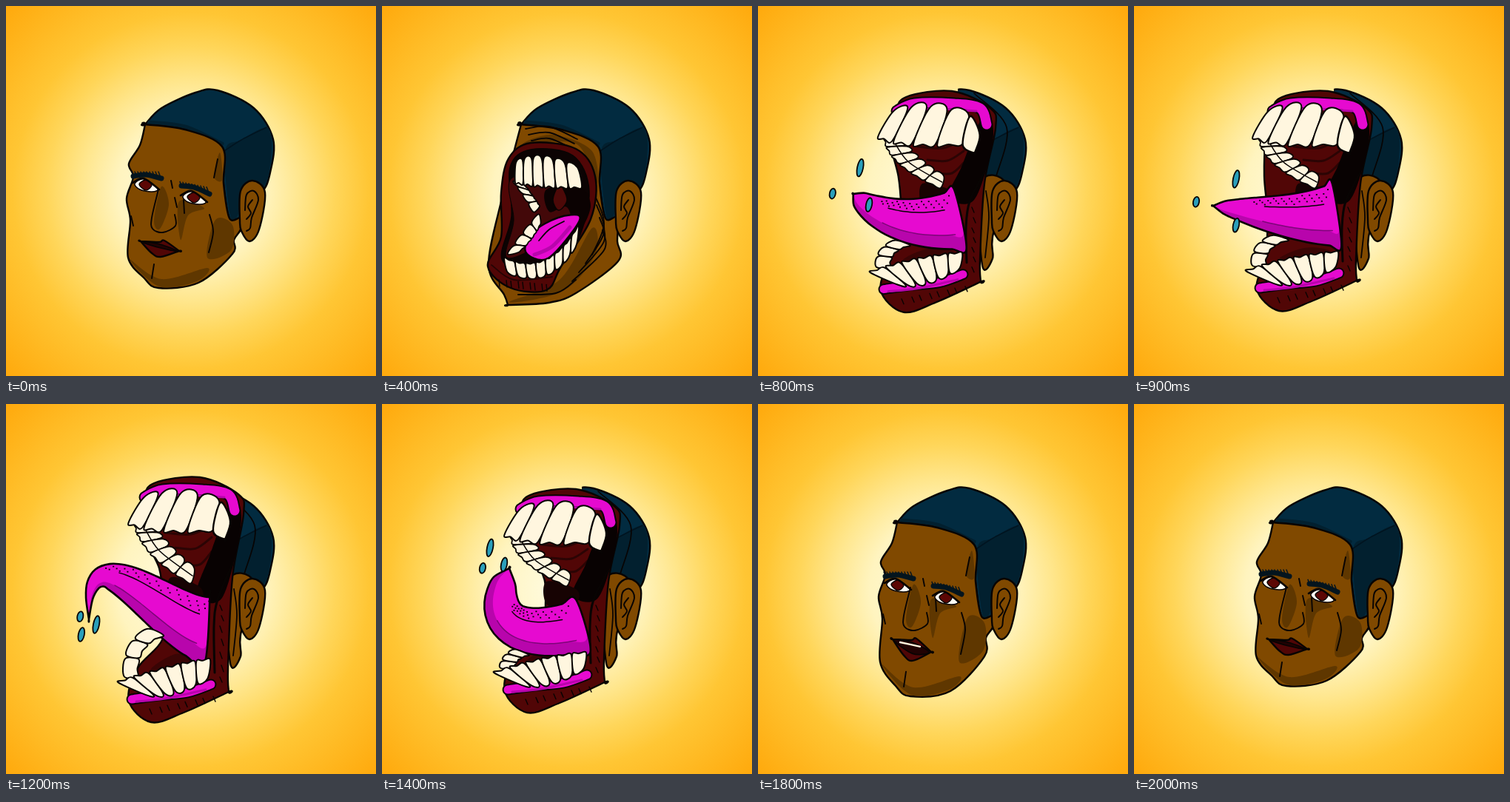
Write an HTML page with a canvas that moves like this. It is 500 px wide and 500 px high and loops after 2.1 s.

```html
<!DOCTYPE html>
<html lang="en">
<head>
<meta charset="utf-8">
<title>Shout</title>
<style>
html, body { margin: 0; height: 100%; overflow: hidden; background: #ffc53a }
canvas { display: block; width: 100vw; height: 100vh }
</style>
</head>
<body>
<canvas id="stage" width="500" height="500"></canvas>
<script>
const ctx = document.getElementById('stage').getContext('2d');
const SKIN = '#804900', SHADE = '#5f3700', HAIR = '#022b40', DEEP = '#02202f', RED = '#510606',
      INK = '#080403', PINK = '#e60ad0', PLUM = '#b805ac', TOOTH = '#fff6df';
const HAIRLINE = '302 287 294 240 292 190 242 167 188 160 188 160 ';
const still = (x, y) => [x, y];
let warp = still;

const nums = s => s.split(' ').map(Number);
const clamp = v => Math.max(0, Math.min(1, v));
const mix = (a, b, f) => Array.isArray(a) ? a.map((v, i) => mix(v, b[i], f)) : a + (b - a) * f;

// Smooth curve through points; a doubled point makes a corner.
function trace(pts, closed) {
  const p = typeof pts === 'string' ? nums(pts) : pts, n = p.length / 2;
  const at = i => {
    i = closed ? (i + n) % n : Math.max(0, Math.min(n - 1, i));
    return warp(p[2 * i], p[2 * i + 1]);
  };
  ctx.beginPath();
  ctx.moveTo(...at(0));
  for (let i = 0; i < (closed ? n : n - 1); i++) {
    const [a, b, c, d] = [at(i - 1), at(i), at(i + 1), at(i + 2)];
    ctx.bezierCurveTo(b[0] + (c[0] - a[0]) / 6, b[1] + (c[1] - a[1]) / 6,
      c[0] - (d[0] - b[0]) / 6, c[1] - (d[1] - b[1]) / 6, c[0], c[1]);
  }
  if (closed) ctx.closePath();
}
function stroke(width, color = INK) {
  ctx.lineWidth = width;
  ctx.strokeStyle = color;
  ctx.stroke();
}
function shape(pts, fill, width = 2.4) {
  trace(pts, true);
  ctx.fillStyle = fill;
  ctx.fill();
  if (width) stroke(width);
}
function line(pts, width = 2, color) {
  trace(pts, false);
  stroke(width, color);
}
function tube(pts, width, color) {
  line(pts, width + 4);
  stroke(width, color);
}

// Point on the parabola through three key points.
function along([ax, ay, mx, my, bx, by], u) {
  const a = (1 - u) * (1 - 2 * u), m = 4 * u * (1 - u), b = u * (2 * u - 1);
  return [a * ax + m * mx + b * bx, a * ay + m * my + b * by];
}
// A row of teeth filling the band between a gum curve and a biting edge.
function teeth(gum, edge, count, width = 2) {
  const [g, e] = [gum, edge].map(c => typeof c === 'string' ? nums(c) : c);
  for (let i = 0; i < count; i++) {
    const u = k => (i + k) / count;
    shape([...along(g, u(.1)), ...along(g, u(.9)), ...along(e, u(1)),
      ...along(e, u(.5)), ...along(e, u(.08))], TOOTH, width);
  }
}
function ticks(count, x, y, dx, dy, lx, ly) {
  for (let i = 0; i < count; i++) {
    const cx = x + i * dx + i % 2 * 2, cy = y + i * dy;
    line([cx, cy, cx + lx, cy + ly], 1.4);
  }
}

function backdrop() {
  const g = ctx.createRadialGradient(250, 250, 0, 250, 250, 354);
  [[0, '#fffce6'], [.28, '#fff4bf'], [.42, '#ffe68c'], [.55, '#ffd65a'], [.68, '#ffc634'], [1, '#ffa90c']]
    .forEach(s => g.addColorStop(...s));
  ctx.fillStyle = g;
  ctx.fillRect(0, 0, 500, 500);
}

function hair() {
  shape(HAIRLINE + '210 138 256 117 286 114 335 138 361 180 357 225 346 250 322 248 317 286', HAIR);
  shape('296 197 318 181 354 165 358 205 348 244 322 246 313 283 303 283', DEEP, 0);
  line('194 157 242 163 292 186', 5, DEEP);
  line('295 196 318 181 352 164', 1.6, '#011420');
}
function ear() {
  shape('316 290 317 250 333 236 350 252 342 302 329 318 318 304', SKIN);
  line('323 276 325 255 335 250 341 262 332 286 330 300 325 304', 2);
  line('333 262 327 271 331 280 325 288', 2);
}

function eye(x, y, tilt) {
  shape([x - 15, y - 2, x - 2, y - 8, x + 16, y + 5, x + 8, y + 9, x - 8, y + 6], '#fffdf4', 1.5);
  shape([x - 9, y - 1, x, y - 7, x + 8, y, x, y + 7], '#5c0705', 1.4);
  line([x - 18, y - 3, x - 3, y - 9, x + 18, y + 6], 2.6);
  line([x - 17, y - 12 - tilt, x, y - 14, x + 21, y - 9 + tilt], 7, '#04151e');
  for (let i = 0; i < 10; i++) {
    const bx = x - 17 + i * 4, by = y - 13 + tilt * (i - 4.5) / 5;
    line([bx, by, bx - 2, by - 5], 1.5, '#04151e');
  }
}

function calmFace(open) {
  const jaw = (x, y) => [x, y + open * 14 * clamp((y - 322) / 30)];
  warp = jaw;
  shape(HAIRLINE + '181 188 166 213 172 231 163 260 168 290 165 340 186 367 206 381 260 374 306 335 308 316 317 302 318 286', SKIN);
  shape('167 342 210 369 272 354 258 372 207 379', SHADE, 0);
  shape('210 244 200 290 208 301 220 268', SHADE, 0);
  shape('234 264 268 273 246 283 236 316', SHADE, 0);
  shape('283 289 306 296 304 330 272 340', SHADE, 0);
  shape('289 198 292 235 281 230', SHADE, 0);
  ['206 248 197 286 198 301 212 306 229 297 228 282', '228 259 231 272', '223 236 225 246', '240 262 241 280',
    '275 282 280 305 274 333', '286 207 281 232', '200 349 197 368', '169 284 172 297'].forEach(p => line(p, 1.9));

  warp = (x, y) => [x, y + open * 3];
  eye(189, 242, 0);
  eye(254, 259, 4);

  warp = jaw;
  shape('182 318 182 318 207 319 214 317 234 331 234 331 209 339 197 334', RED);
  const gap = open * 11;
  shape([184, 319, 208, 322, 231, 331, 209, 327 + gap / 2], '#210203', 1.8);
  if (open) line('192 322 219 326', 2.4, TOOTH);
  warp = still;
}

function openFace(size) {
  const big = size > 1;
  warp = (x, y) => big
    ? [Math.min(x, 290 + (x - 290) * size), Math.min(y, 292 + (y - 292) * size)]
    : [x, 160 + (y - 160) * (3 + size) / 4];
  shape(HAIRLINE + '179 194 162 260 144 350 165 390 170 404 170 404 225 401 262 388 319 345 318 318 318 286', SKIN);
  shape('284 300 288 336 245 385 172 400 240 370', SHADE, 0);
  shape('190 188 230 174 283 195 290 240 262 186', SHADE, 0);
  for (let i = 0; i < 3; i++) line([194 + i * 4, 166 + i * 8, 226, 163 + i * 8, 264 - i * 4, 180 + i * 6], 1.8);
  for (let i = 0; i < 4; i++) line([286 + i * 4, 252 + i * 17, 300, 294 + i * 12, 284 - i * 9, 336 + i * 12], 1.9);
  line('262 370 235 388 184 390');

  warp = (x, y) => big
    ? [290 + (x - 290) * size, 292 + (y - 292) * size]
    : [220 + (x - 220) * (size + 1) / 2, 310 + (y - 310) * size];
  shape('171 206 201 185 262 193 288 230 282 288 242 352 222 384 174 381 143 352 161 312 161 252', RED);
  shape('173 218 201 194 258 202 280 250 265 316 236 352 200 360 162 342 175 284', '#0c0303', 1.5);
  shape('176 232 254 238 260 278 220 318 169 340 178 290', '#430809', 1);
  shape('222 248 265 243 282 270 264 306 250 272 226 278', '#0b0202', 0);
  shape('240 242 250 262 239 276 231 262', '#4d0908', 1.5);
  shape('194 332 205 305 238 286 267 284 255 308 222 342', PINK);
  line('206 336 230 325 254 299', 5, PLUM);
  line('212 317 226 302 246 291', 1.8);
  teeth('177 236 190 254 206 280', '191 240 203 256 213 271', 4, 1.8);
  teeth('213 280 190 308 169 337', '215 292 202 314 184 333', 4, 1.8);
  teeth('180 212 217 206 266 219', '179 238 218 243 270 245', 6);
  teeth('168 359 222 363 264 320', '164 340 220 344 266 296', 8);
  ticks(9, 158, 370, 8, .8, 1, 9);
  line('148 350 178 370 230 366', 1.8, '#250303');
  warp = still;
}

function drops({ spray, reach, spin }) {
  for (let i = 0; i < 3; i++) {
    const a = spin + i * 2.1;
    ctx.beginPath();
    ctx.ellipse(spray[0] + reach * Math.cos(a), spray[1] + reach * Math.sin(a), 4, 12 - i * 2.5, .2, 0, 7);
    ctx.fillStyle = '#2a9fbb';
    ctx.fill();
    stroke(1.8);
  }
}

// A tapering ribbon along a cubic spine; side 1 is its upper edge, -1 its lower.
function tongue({ spine, root, tip }) {
  const [ax, ay, bx, by, cx, cy, dx, dy] = spine;
  const at = (t, side) => {
    const s = 1 - t;
    const cubic = (a, b, c, d) => a * s ** 3 + 3 * b * s * s * t + 3 * c * s * t * t + d * t ** 3;
    const slope = (a, b, c, d) => s * s * (b - a) + 2 * s * t * (c - b) + t * t * (d - c);
    const vx = slope(ax, bx, cx, dx), vy = slope(ay, by, cy, dy);
    const half = side * mix(root, tip, t) * Math.sqrt(1 - t ** 8) / Math.hypot(vx, vy);
    return [cubic(ax, bx, cx, dx) - vy * half, cubic(ay, by, cy, dy) + vx * half];
  };
  const edge = (side, from = 0, to = 1) =>
    Array.from({ length: 13 }, (_, i) => at(mix(from, to, i / 12), side));
  const ribbon = low => [...edge(1), ...edge(low).reverse()].flat();
  shape(ribbon(-1), PLUM, 0);
  shape(ribbon(-.5), PINK, 0);
  line(edge(-.5, .05, .6).flat(), 1.5, '#7d0678');
  line(edge(.4, .1, .6).flat(), 1.5);
  trace(ribbon(-1), true);
  stroke(2.6);
  ctx.fillStyle = INK;
  for (let i = 0; i < 30; i++) {
    const [x, y] = at(.05 + i * .022, .85 - i * 7 % 11 / 30);
    ctx.fillRect(x - 1, y - 1, 2, 1.8);
  }
}

function upperJaw(shift) {
  tube('188 142 212 132 265 132 300 138 309 160', 13, PINK);
  line('194 143 240 139 295 142', 3, PLUM);
  ctx.save();
  ctx.translate(shift, 0);
  teeth('198 180 220 206 256 231', '175 178 195 213 250 246', 6, 1.8);
  line('186 181 207 211 252 238', 1.5);
  teeth('184 143 234 136 291 148', '164 176 211 186 280 186', 4);
  shape('290 149 303 174 296 199 296 199 280 188', TOOTH);
  ctx.restore();
}
function lowerJaw(rise) {
  tube('170 386 205 381 245 377 277 366', 11, PINK);
  line('176 389 215 385 270 373', 3, PLUM);
  teeth([160, 358, 166, 358 - rise * .65, 170 + rise * .45, 356 - rise],
    [178, 358, 184, 362 - rise * .65, 186 + rise * .5, 364 - rise], 3);
  teeth('188 380 228 376 274 357', '150 364 214 346 276 336', 6);
}

function roar(pose) {
  const { up, low, edge } = pose;
  ctx.save();
  ctx.beginPath();
  ctx.rect(270, 0, 230, 500);
  ctx.clip();
  hair();
  ctx.restore();
  line('292 118 336 164 322 230', 1.7);
  shape('300 240 334 240 317 312 317 341 303 350', SKIN);
  line('308 250 312 285 307 340', 1.8);
  ear();

  warp = (x, y) => [x, y + up * clamp((260 - y) / 60) + low * clamp((y - 300) / 50)];
  shape(['186 145 200 123 262 115 314 138 321 165 306 240 300 345 301 376 301 376 240 404 196 417 166 388 178 345',
    edge, 315, edge, 275, edge - 4, 230, '178 180'].join(' '), RED);
  for (let i = 0; i < 3; i++) line([216 + i * 13, 190 + i * 18, 250 + i * 6, 192 + i * 17, 278, 180 + i * 16], 3, '#2b0404');
  shape('300 156 315 152 316 190 292 262 258 258 276 215', '#080202', 0);
  shape('222 240 262 250 262 268 224 272', '#170303', 0);
  line('306 225 286 264 281 300 282 350', 3);
  shape('196 346 230 330 264 334 262 352 205 358', '#3a0505', 0);
  warp = still;
  tongue(pose);
  warp = (x, y) => [x, y + up * clamp((260 - y) / 60) + low * clamp((y - 300) / 50)];
  upperJaw(pose.shift);
  lowerJaw(pose.rise);
  ticks(8, 194, 399, 12, -2.4, 3, 7);
  ticks(7, 289, 272, 0, 14, 3, 7);
  warp = still;
  drops(pose);
}

const curled = { at: 6, up: 0, low: 0, shift: 0, edge: 221, rise: 25, root: 36, tip: 20,
  spine: [272, 299, 180, 325, 140, 290, 172, 222], spray: [149, 211], reach: 17, spin: -1.75 };
const straight = { at: 9, up: 0, low: -5, shift: -5, edge: 180, rise: 46, root: 43, tip: 9,
  spine: [274, 282, 220, 290, 165, 278, 107, 270], spray: [120, 265], reach: 36, spin: -1.05 };
const hanging = { at: 12, up: -16, low: 13, shift: 0, edge: 211, rise: 54, root: 46, tip: 3,
  spine: [272, 304, 220, 300, 105, 155, 112, 291], spray: [108, 299], reach: 14, spin: -.07 };
const poses = [curled, straight, hanging, { ...curled, at: 14 }];

function poseAt(step) {
  const next = poses.findIndex(p => p.at > step);
  if (next < 0) return poses[3];
  const a = poses[next - 1], b = poses[next], f = (step - a.at) / (b.at - a.at);
  return Object.fromEntries(Object.keys(a).map(k => [k, mix(a[k], b[k], f)]));
}

// The face opens and closes through the same steps.
function draw(step) {
  const near = Math.min(step, 20 - step);
  backdrop();
  if (near > 5) return roar(poseAt(step));
  hair();
  if (near < 3) calmFace(near / 2);
  else openFace([.78, 1, 1.08][near - 3]);
  ear();
}

ctx.lineJoin = ctx.lineCap = 'round';
const start = performance.now();
let shown = -1;
function tick() {
  const step = Math.floor((performance.now() - start) / 100) % 21;
  if (step !== shown) draw(shown = step);
  requestAnimationFrame(tick);
}
tick();
</script>
</body>
</html>
```
